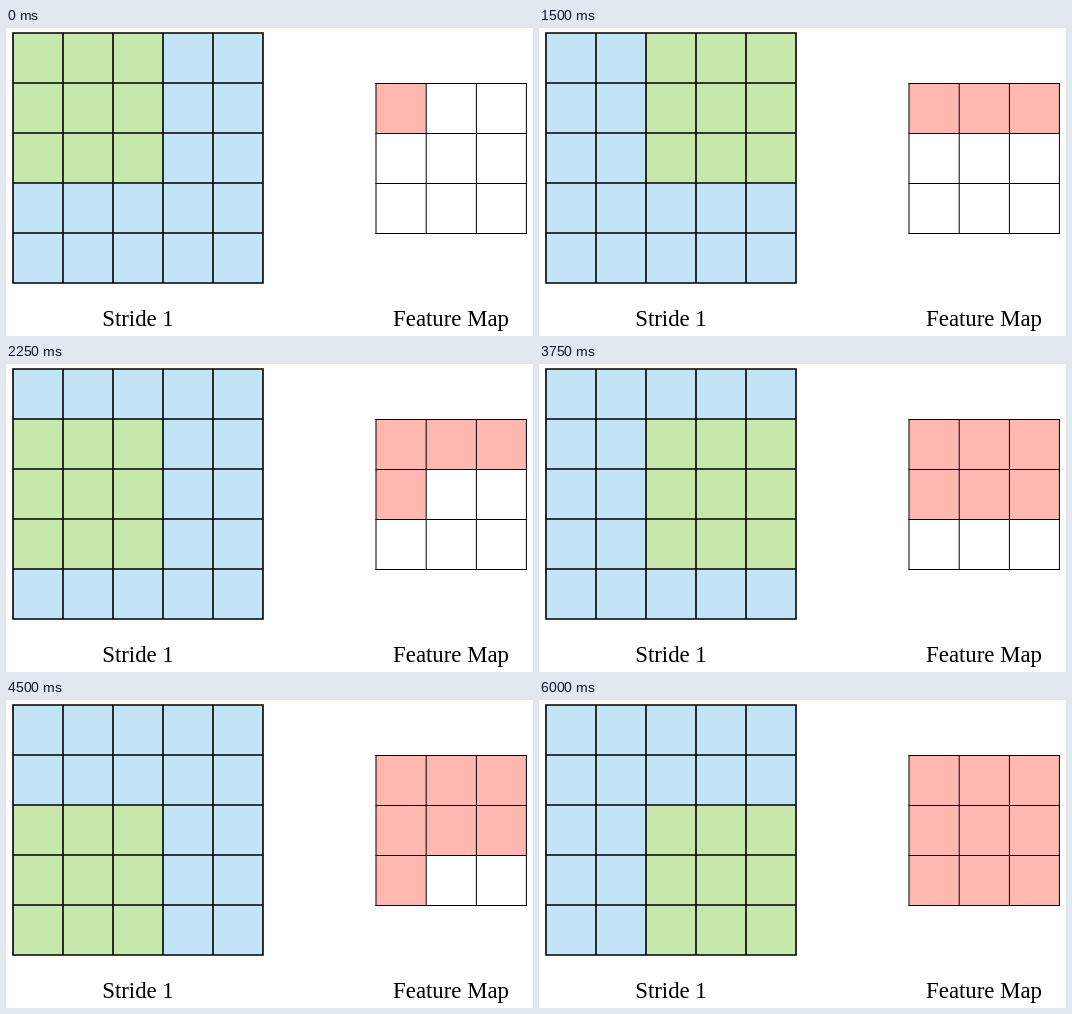
An HTML page that plays this animation: 527 px wide and 308 px high, repeating every 6.75 s.

```html
<!DOCTYPE html>
<html lang="en">
<head>
<meta charset="utf-8">
<title>Convolution with stride 1</title>
<style>
  html, body { margin: 0; width: 100%; height: 100%; overflow: hidden; background: #fff; }
  svg { display: block; width: 100%; height: 100%; }
  text { font: 22.8px "Liberation Serif", "Times New Roman", serif; text-anchor: middle; }
  path { fill: none; stroke: #000; }

  /* Both boards share the same stepping: three columns per row, three rows per loop. */
  .column { animation: column 2250ms steps(3) infinite; }
  .row { animation: row 6750ms steps(3) infinite; }
  @keyframes column { from { transform: translateX(0); } to { transform: translateX(150px); } }
  @keyframes row { from { transform: translateY(0); } to { transform: translateY(150px); } }
</style>
</head>
<body>
<svg viewBox="0 0 527 308">
  <defs>
    <clipPath id="map"><rect x="370" y="55.5" width="150" height="150"/></clipPath>
  </defs>

  <rect x="7" y="5" width="250" height="250" fill="#c2e4f6"/>
  <g class="row">
    <rect class="column" x="7" y="5" width="150" height="150" fill="#c7e8ac"/>
  </g>
  <path stroke-width="1.6" stroke-linecap="square"
        d="M7 5h250M7 55h250M7 105h250M7 155h250M7 205h250M7 255h250
           M7 5v250M57 5v250M107 5v250M157 5v250M207 5v250M257 5v250"/>

  <!-- White covers slide away to reveal the filled cells. -->
  <g clip-path="url(#map)">
    <rect x="370" y="55.5" width="150" height="150" fill="#ffb8b0"/>
    <g class="row" fill="#fff">
      <rect x="370" y="105.5" width="150" height="150"/>
      <rect class="column" x="420" y="55.5" width="150" height="50"/>
    </g>
  </g>
  <path stroke-width="1" stroke-linecap="square"
        d="M370 55.5h150M370 105.5h150M370 155.5h150M370 205.5h150
           M370 55.5v150M420.2 55.5v150M470.4 55.5v150M520.4 55.5v150"/>

  <text x="132" y="298">Stride 1</text>
  <text x="445" y="298">Feature Map</text>
</svg>
</body>
</html>
```
